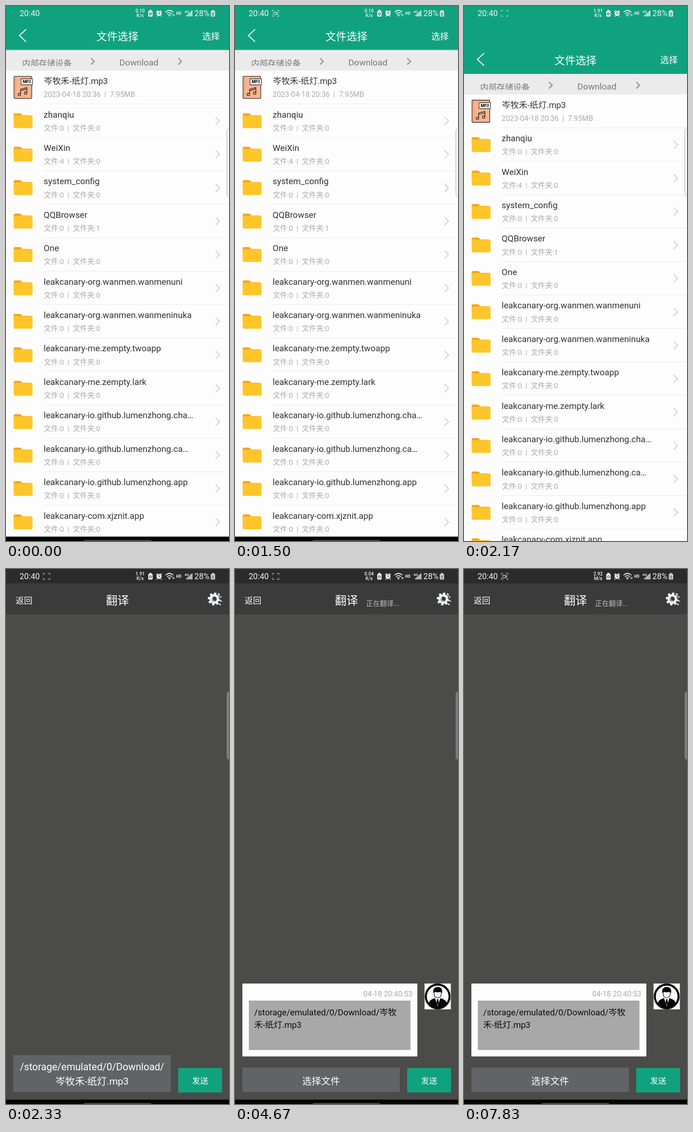
An HTML page that plays this animation: 483x1159 px, repeating every 8 s.

```html
<!DOCTYPE html>
<html lang="zh-CN">
<head>
<meta charset="utf-8">
<title>文件选择</title>
<style>
html, body { margin: 0; width: 100%; height: 100%; overflow: hidden; background: #4b4b4a; }
svg { display: block; width: 100%; height: 100%; }
text { font-family: Roboto, "Noto Sans CJK SC", "Noto Sans CJK", sans-serif; white-space: pre; }
</style>
</head>
<body>
<svg id="stage" viewBox="0 0 483 1159" preserveAspectRatio="none"></svg>
<script>
const LOOP = 8000;
const GREEN = '#10a27e';
const ROW = 72.42, LIST_TOP = 139.7;
const SONG = ['岑牧', '禾-纸灯.mp3'];
const DIR = '/storage/emulated/0/Download/';

const folders = [
  'zhanqiu', 'WeiXin', 'system_config', 'QQBrowser', 'One',
  'leakcanary-org.wanmen.wanmenuni', 'leakcanary-org.wanmen.wanmeninuka',
  'leakcanary-me.zempty.twoapp', 'leakcanary-me.zempty.lark',
  'leakcanary-io.github.lumenzhong.cha…', 'leakcanary-io.github.lumenzhong.ca…',
  'leakcanary-io.github.lumenzhong.app', 'leakcanary-com.xjznit.app'
];

const text = (s, x, y, size, fill, extra = '') =>
  `<text x="${x}" y="${y}" font-size="${size}" fill="${fill}" ${extra}>${s}</text>`;
const rect = (x, y, w, h, fill, extra = '') =>
  `<rect x="${x}" y="${y}" width="${w}" height="${h}" fill="${fill}" ${extra}/>`;
const line = (d, color, width, extra = '') =>
  `<path d="${d}" fill="none" stroke="${color}" stroke-width="${width}" ${extra}/>`;
const shape = (d, fill) => `<path d="${d}" fill="${fill}"/>`;
const group = (id, body) => `<g id="${id}">${body}</g>`;
const MID = 'text-anchor="middle"', END = 'text-anchor="end"';

function folderIcon() {
  return shape('M16.6 37V23.400q0-3 3-3H30q2 0 3 1.500L35 24.400H53q3 0 3 3V37z', '#f7a21c') +
    rect(16.6, 25, 41, 27.6, '#fec62a', 'rx="3"');
}

function songIcon() {
  return rect(17.4, 12.6, 38.4, 48, '#f9b48e', 'rx="1.5" stroke="#33261f" stroke-width="1.3"') +
    line('M20.800 13V60', '#c08a6a', 0.8) +
    rect(32.6, 18, 24.6, 13, '#fff', 'rx="1" stroke="#222" stroke-width="1.2"') +
    text('MP3', 45, 27.6, 8.4, '#111', MID + ' font-weight="900"') +
    line('M31.700 52V40.500L45.300 37V49M31.700 43.500L45.300 40', '#33261f', 1.4) +
    '<g fill="#f9b48e" stroke="#33261f" stroke-width="1.4"><circle cx="29" cy="52" r="2.7"/><circle cx="42.6" cy="49" r="2.7"/></g>';
}

function row(i) {
  const name = folders[i - 1];
  const info = `文件:${name === 'WeiXin' ? 4 : 0}  |  文件夹:${name === 'QQBrowser' ? 1 : 0}`;
  const body = i === 0
    ? songIcon() + text(SONG.join(''), 82, 29.6, 18.4, '#333') +
      text('2023-04-18 20:36  |  7.95MB', 81.5, 57.6, 15.9, '#aaa')
    : folderIcon() + text(name, 81.6, 29.4, 18.8, '#333') +
      text(info, 82, 57.6, 15.55, '#aaa') +
      line('M454 28l8.6 8.8l-8.6 8.8', '#bbb', 1.3);
  return `<g transform="translate(0 ${(LIST_TOP + i * ROW).toFixed(2)})">${body}${rect(82, 72, 401, 1, '#e8e8ee')}</g>`;
}

function picker() {
  const crumb = x => line(`M${x} 113l7 7l-7 7`, '#9b9b9b', 2.8);
  return rect(0, 95, 483, 1120, '#fdfdfd') +
    rect(0, -60, 483, 155.5, GREEN) +
    line('M43.500 50.500L29 64L43.500 77.500', '#fff', 2) +
    text('文件选择', 241.5, 74.2, 22.8, '#fff', MID) +
    text('选择', 463, 72.5, 19, '#fff', END) +
    rect(0, 95.5, 483, 44.5, '#ebebeb') +
    '<clipPath id="crumbs"><rect x="0" y="95" width="240" height="35"/></clipPath>' +
    text('内部存储设备', 35, 131, 17.9, '#777', 'clip-path="url(#crumbs)"') +
    text('Download', 245.6, 129.3, 19, '#777') + crumb(184) + crumb(373) +
    Array.from({ length: folders.length + 1 }, (_, i) => row(i)).join('');
}

function gear() {
  const teeth = Array.from({ length: 8 }, (_, i) =>
    rect(-2.6, -14, 5.2, 6, '#f2f6fa', `rx="1" transform="rotate(${i * 45 + 10})"`)).join('');
  return `<g transform="translate(451 65)">${teeth}` +
    '<circle r="8" fill="#3b3b3b" stroke="#f2f6fa" stroke-width="5"/>' +
    line('M-3-4a5 5 0 0 0 5 8', '#cfdbe6', 1.4) +
    line('M8-12l4 3M12-4l4-1M13 4l4 1M10 10l4 3', '#dfe8f0', 2.2) +
    line('M9-8l3 3M11 1l3 0', '#3b3b3b', 1.6) + '</g>';
}

function avatar() {
  return rect(410.5, 898, 57, 56, '#fdfdfd') +
    '<circle cx="439" cy="926" r="25.7" fill="#fdfdfd" stroke="#080808" stroke-width="4.4"/>' +
    shape('M419 943q1-10 13-13h14q12 3 13 13q-8 8-20 8t-20-8z', '#080808') +
    shape('M433 929l6 18l6-18z', '#fdfdfd') +
    shape('M437.5 932h3l1 8l-2.5 5l-2.5-5z', '#080808') +
    rect(431.5, 912, 15, 17, '#fdfdfd', 'rx="7" stroke="#080808" stroke-width="1.2"') +
    shape('M429.5 919q-2-13 9.5-13.5q11.5 0 9.5 13.5l-3-3q-6 2-13 0z', '#080808');
}

function chat() {
  const send = rect(373, 1081, 95, 53, GREEN) + text('发送', 420.5, 1114.8, 17.6, '#fff', MID);
  const ready = rect(16, 1053, 341, 80, '#626366') +
    text(DIR, 186.5, 1086, 21.4, '#fff', MID) +
    text(SONG.join(''), 186.5, 1116.5, 21, '#fff', MID);
  const sent = text('正在翻译...', 284, 79.5, 14.9, '#bdbdbd') +
    rect(16, 898, 379, 158, '#fdfdfd') +
    text('04-18 20:40:53', 384, 926, 16, '#aaa', END) +
    rect(30, 935, 350, 107, '#a8a8a8') +
    text(DIR + SONG[0], 41.5, 967, 18.6, '#0c0c0c') +
    text(SONG[1], 41.5, 994.3, 18.5, '#0c0c0c') +
    avatar() +
    rect(16, 1080, 341, 53, '#626366') +
    text('选择文件', 186.5, 1116.5, 20.5, '#fff', MID);
  return rect(0, 0, 483, 1159, '#4b4b4a') +
    rect(0, 31, 483, 67, '#3b3b3b') + rect(0, 0, 483, 31, '#2b2b2b') +
    text('返回', 21, 74.6, 17.9, '#fff') +
    text('翻译', 241.5, 76.5, 25, '#fff', MID) +
    gear() + send + group('ready', ready) + group('sent', sent);
}

function statusBar() {
  const c = '#eef4f2';
  const small = (id, y) => `<text id="${id}" x="290.5" y="${y}" font-size="10" font-weight="500" fill="${c}" ${MID}></text>`;
  const bars = [3, 5.5, 8, 10.5, 13].map((h, i) => rect(390.5 + i * 2.8, 22.5 - h, 1.9, h, c)).join('');
  return text('20:40', 29.5, 22, 17.5, c) +
    group('bracket', line('M81 13V9.5H85M91 9.5H95V13M95 19V22.5H91M85 22.5H81V19', c, 1, 'opacity="0.85"')) +
    group('camera', rect(84, 13.5, 5.5, 5.5, 'none', `stroke="${c}" stroke-width="1"`) +
      line('M89.5 15.5l3-1.5v4.5l-3-1.5', c, 1)) +
    small('rate', 14) + small('unit', 23.5) +
    rect(308, 10.5, 9.6, 12.5, c, 'rx="2"') + rect(310.5, 8.5, 4.6, 3, c) +
    '<circle cx="312.8" cy="17" r="2.3" fill="none" stroke="#555" stroke-width="1.3"/>' +
    `<circle cx="331.5" cy="16.2" r="5.5" fill="${c}"/>` +
    line('M331.5 13v3.5l2.5 1', '#444', 1.3) +
    line('M325.5 12.5l3.5-3M337.5 12.5l-3.5-3M327.5 21l-1.5 2M335.5 21l1.5 2', c, 1.6) +
    line('M345.5 13.5q8.5-8 17 0M348.5 16.8q5.5-5 11 0M351.3 19.8q2.7-2.5 5.4 0', c, 1.7) +
    `<circle cx="354" cy="21.5" r="1.3" fill="${c}"/>` +
    line('M361.5 17v5M364 17.5v4', c, 1.2) +
    text('HD', 368.5, 18.8, 8.4, c, 'font-weight="700"') +
    text('4G', 386.5, 14.5, 8, c, 'font-weight="500"') + bars +
    text('28%', 408, 22, 17.6, c) +
    rect(443.5, 10.5, 9.5, 12.5, c, 'rx="1.5" opacity="0.8"') + rect(446, 8.8, 4.5, 2.5, c, 'opacity="0.8"') +
    line('M448.3 13v5M446 16l2.3 2.5l2.3-2.5M446 20.5h4.6', '#555', 1);
}

document.getElementById('stage').innerHTML =
  group('picker', picker()) + group('chat', chat()) + statusBar() +
  '<rect id="handle" x="478.5" y="266" width="16" height="146.5" rx="5"/>' +
  group('nav', rect(0, 1149.5, 483, 10, '#050505') + rect(168, 1156.8, 147, 6, '#4a4a4a', 'rx="3"'));

const el = id => document.getElementById(id);
const show = (id, on) => el(id).setAttribute('visibility', on ? 'inherit' : 'hidden');

const rates = [[7665, '2.92', 'M/s'], [4665, '0.04', 'K/s'], [1665, '1.91', 'K/s'], [0, '0.10', 'K/s']];

function draw(t) {
  const dark = t >= 2325, shifted = t >= 2165 && !dark, done = t >= 2995;
  show('picker', !dark);
  show('chat', dark);
  show('ready', dark && !done);
  show('sent', dark && done);
  show('nav', !shifted);
  show('bracket', t >= 830);
  show('camera', t >= 830 && t < 1995 || t >= 7165);
  el('picker').setAttribute('transform', `translate(0 ${shifted ? 51.7 : 0})`);
  const handle = el('handle');
  handle.setAttribute('fill', dark ? '#7d7d7d' : '#fafafa');
  handle.setAttribute('stroke', dark ? '#858585' : '#a5a5a5');
  const [, rate, unit] = rates.find(r => t >= r[0]);
  el('rate').textContent = rate;
  el('unit').textContent = unit;
}

function tick() {
  draw(performance.now() % LOOP);
  requestAnimationFrame(tick);
}
tick();
</script>
</body>
</html>
```
